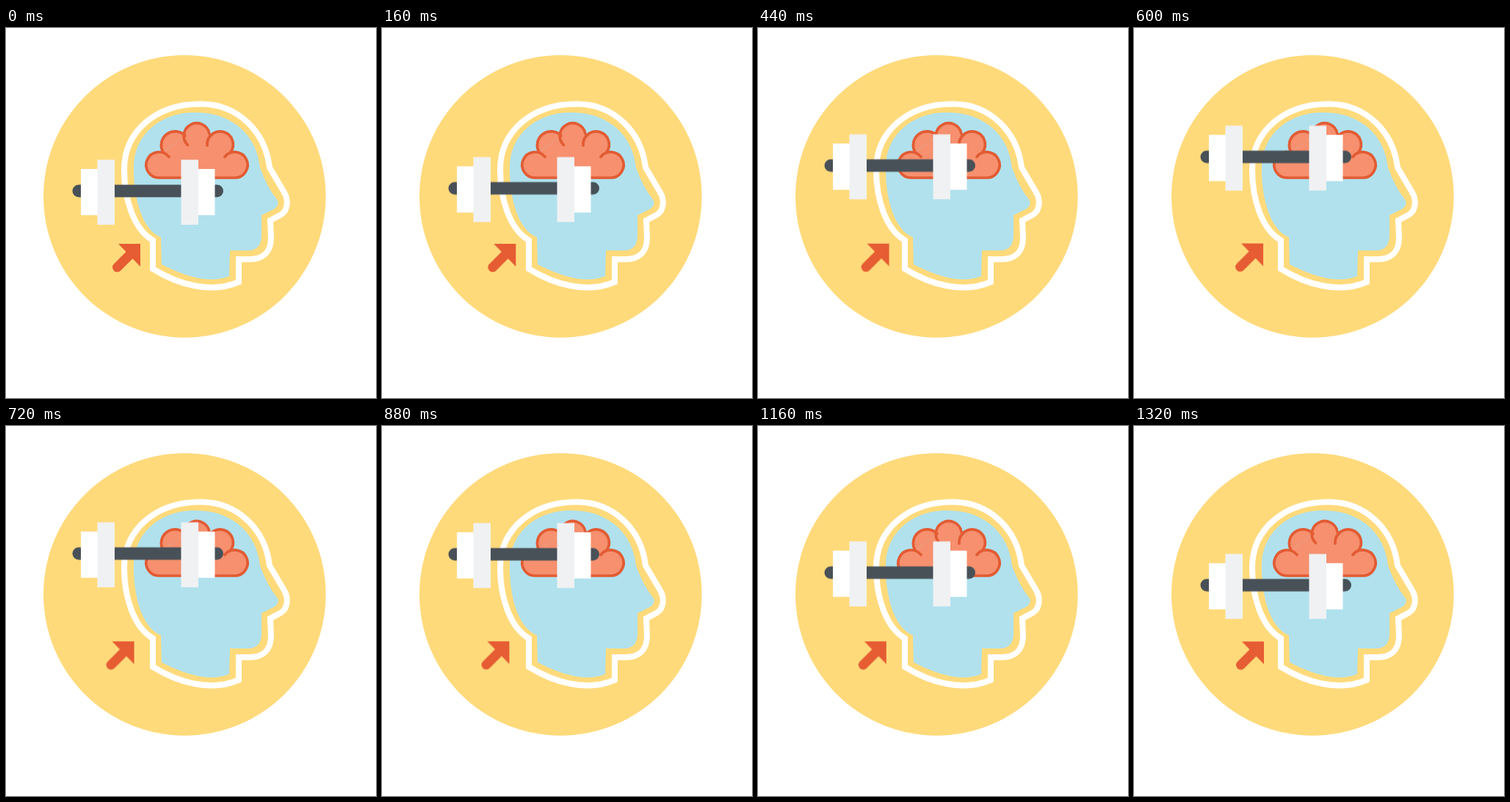
Recreate the animation shown at these times as an HTML page without scripts. Size 504x504 px, loop 1360 ms.

```html
<!DOCTYPE html>
<html lang="en">
<head>
<meta charset="utf-8">
<title>Brain training</title>
<style>
  html, body { margin: 0; width: 100%; height: 100%; overflow: hidden; background: #fff; }
  svg { display: block; width: 504px; height: 504px; }

  .dumbbell { animation: lift 1360ms infinite; }
  .arrow { animation: nudge 1360ms infinite; }

  /* Both moves are cut off by the loop before they return to rest. */
  @keyframes lift {
    0%, 0.74% { transform: none; animation-timing-function: cubic-bezier(.5, 0, .5, 1); }
    52.2%, 58.6% { transform: translateY(-48.3px); animation-timing-function: cubic-bezier(.528, 0, .608, .768); }
    100% { transform: translateY(-3px); }
  }
  @keyframes nudge {
    0% { transform: none; animation-timing-function: cubic-bezier(.364, 0, .636, 1); }
    68.4% { transform: translate(-9.6px, -.7px); animation-timing-function: cubic-bezier(.35, 0, .667, .457); }
    100% { transform: translate(-5.4px, -.4px); }
  }
</style>
</head>
<body>
<svg viewBox="0 0 504 504">
  <circle cx="243.3" cy="229.4" r="192.3" fill="#ffda7b"/>

  <g class="head">
    <path fill="none" stroke="#fff" stroke-width="8" d="M200 328V289C175 275 161 235 161 193C161 140 205 103.500 265 103.500C315 103.500 353 140 359 190L379 224C385 234 384 248 375 254L360 262L361 286C361 305 350 315 332 315H317V346C280 362 235 350 200 328Z"/>
    <path fill="#b0e1ed" d="M212 322L211 285C185 275 173 230 174 188C175 145 210 115 258 115C310 115 342 148 346 190Q355 216 370 235Q373 244 360 249L348 255V284Q347 303 330 303H305L304 338Q270 352 212 322Z"/>
  </g>

  <g class="brain" fill="#f6906f">
    <path d="M209 204L214 169L244 147L277 144L306 169L311 204Z"/>
    <path stroke="#e25b33" stroke-width="3.700" stroke-linecap="round" d="M214 169A18.700 18.700 0 0 1 244 147M274 160A17.700 17.700 0 1 1 306 169M247.500 159.500A17.500 17.500 0 1 1 277 144M298 175.500A17.500 17.500 0 1 1 311.500 204H209A17.500 17.500 0 1 1 222 175.500"/>
  </g>

  <g class="arrow" fill="#e65c33">
    <path d="M153 294H183V325Z"/>
    <path d="M151.500 326L172 305.500" stroke="#e65c33" stroke-width="13" stroke-linecap="round"/>
  </g>

  <g class="dumbbell">
    <rect x="90.500" y="213.500" width="205.500" height="17" rx="8.500" fill="#485158"/>
    <path fill="#fff" d="M102 192H125V255H102ZM261 192H284.500V255H261Z"/>
    <path fill="#f0f1f3" d="M124.500 179.500H148V268H124.500ZM238.500 179.500H262V268H238.500Z"/>
  </g>
</svg>
</body>
</html>
```
